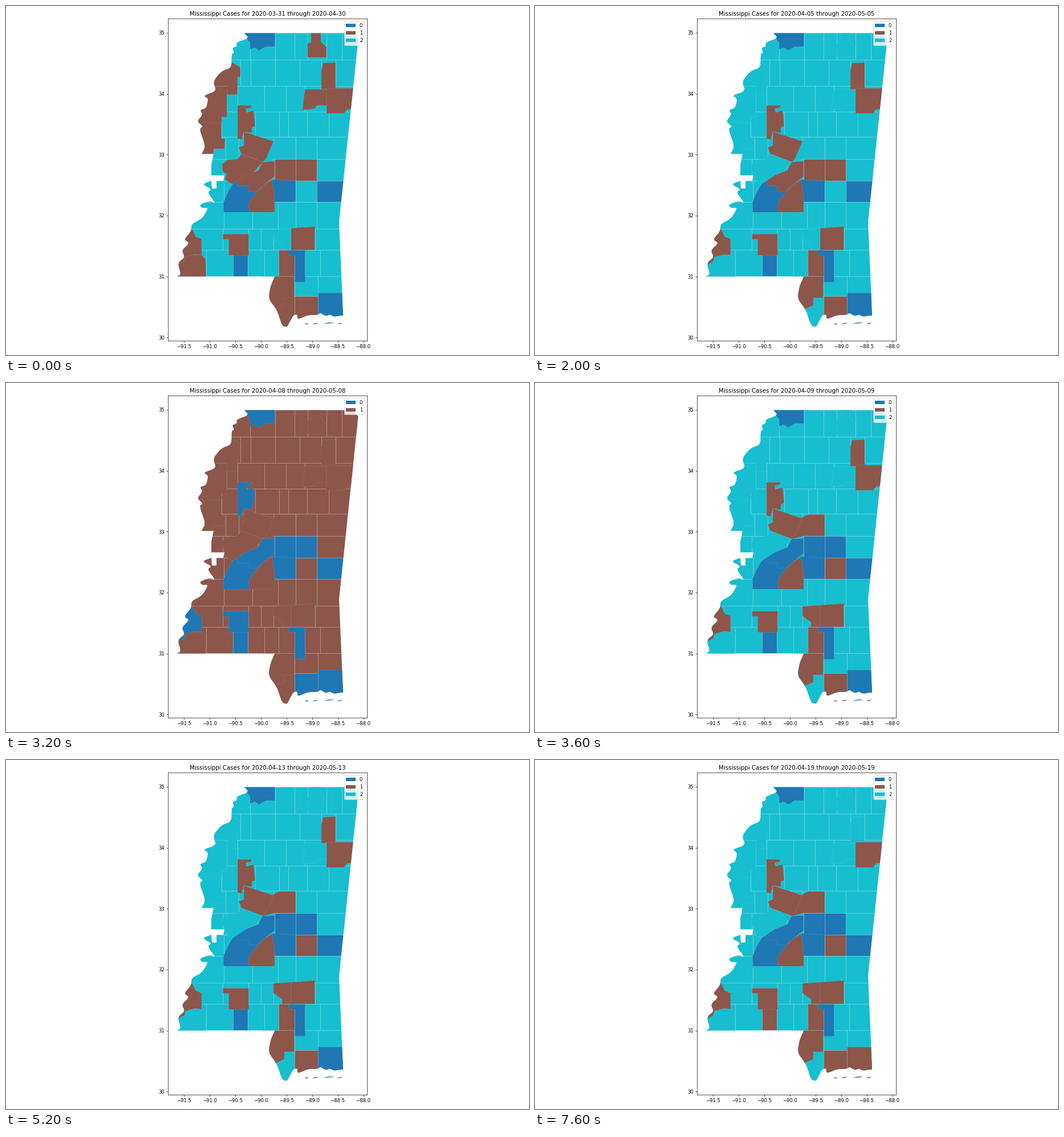
Recreate the animation shown at these times as a matplotlib script. Size 917 px wide and 611 px high, loop 8000 ms.

```python
from collections import defaultdict

import numpy as np
import matplotlib.pyplot as plt
from matplotlib.animation import FuncAnimation
from matplotlib.patches import Patch, Polygon

W, H, DPI = 917, 611, 61.13
LEFT, RIGHT, TOP, BOTTOM = 284, 633, 22, 586.4
COLORS = ["#1f77b4", "#8c564b", "#17becf"]
SEAM = (1, 1, 1, 0.11)
FRAMES, INTERVAL = 20, 400
TWO_CLASS_DAY = 8

plt.rcParams["font.family"] = "DejaVu Sans"
fig = plt.figure(figsize=(W / DPI, H / DPI), dpi=DPI, facecolor="white")
ax = fig.add_axes([LEFT / W, 1 - BOTTOM / H, (RIGHT - LEFT) / W, (BOTTOM - TOP) / H])
# The map is laid out in stage pixels; ticks carry the degrees.
ax.set(xlim=(LEFT, RIGHT), ylim=(BOTTOM, TOP))
lon, lat = np.arange(-91.5, -87.9, 0.5), np.arange(30, 36)
ax.set_xticks(312 + (lon + 91.5) * 89.86, [f"{v:.1f}".replace("-", "\u2212") for v in lon])
ax.set_yticks(47 + (35 - lat) * 106.65, [str(v) for v in lat])


def pts(*xy):
    return np.reshape(xy, (-1, 2))


def winding(*xy):
    """Round the corners of a rough shoreline by cutting them twice."""
    line = pts(*xy)
    for _ in range(2):
        a, b = line[:-1], line[1:]
        cut = np.stack([0.8 * a + 0.2 * b, 0.2 * a + 0.8 * b], axis=1).reshape(-1, 2)
        line = np.vstack([line[:1], cut, line[-1:]])
    return line


east = pts(418, 47.5, 608.5, 47.5, 617.6, 58.5, 584, 378, 591, 542)
gulf = winding(591, 542, 586, 542, 575, 544, 568, 540, 561, 543, 551, 537, 547, 541, 530, 541,
               511, 549, 511, 540, 504, 541, 496, 556, 493, 562, 484, 560, 475, 532, 460, 512,
               464, 490, 471.5, 473.5)
river = np.vstack([
    winding(418, 47.5, 426, 56, 404, 64, 405, 71, 397, 73, 400, 82, 395.5, 84, 395.5, 108,
            378, 114, 363, 132, 369, 149, 346, 157, 355, 162, 351, 179, 340, 182, 345, 190,
            335, 202, 346, 211, 339, 215, 350, 246, 343, 259),
    pts(364, 259, 360, 278, 360, 296.5, 383, 296.5, 381, 306, 369, 306, 369, 319.5, 361, 319.5),
    winding(360, 306, 344, 312, 361, 321, 353, 326, 368, 346, 357, 341, 339, 348, 344, 354,
            355, 353, 344, 372, 325, 382, 325, 394, 312, 409, 322, 415, 308, 428, 314, 440,
            301, 450, 307, 470, 300, 473.5),
])
land = ax.add_patch(Polygon(np.vstack([east, gulf, river[::-1]]), fc="none", lw=0))

regions = defaultdict(list)


def paint(name, outline):
    patch = ax.add_patch(Polygon(outline, ec=SEAM, lw=0.85, zorder=2))
    patch.set_clip_path(land)
    regions[name].append(patch)


def county(name, *xy):
    """Redraw a county over its rectangular cell, which falls to the neighbours."""
    regions["rest"] += regions.pop(name, [])
    paint(name, pts(*xy))


def band(top, bottom, names, *splits):
    edges = (270, *splits, 640)
    for name, x0, x1 in zip(names.split(), edges, edges[1:]):
        paint(name, pts(x0, top, x1, top, x1, bottom, x0, bottom))


# Counties lie in west-to-east bands; later shapes cover earlier ones.
band(40, 94.5, "Tunica DeSoto Marshall Benton Tippah Alcorn Tishomingo",
     428, 471.5, 505.5, 529, 562, 589)
band(94.5, 140.5, "Coahoma Quitman Panola Lafayette Pontotoc Lee Itawamba",
     411, 428.5, 471.5, 514.5, 553, 578)
band(140.5, 185, "Bolivar Sunflower Tallahatchie Yalobusha Calhoun Chickasaw Monroe",
     387, 406, 453, 491, 524, 562)
band(185, 229.5, "Washington Sunflower Leflore Carroll Montgomery Webster Oktibbeha Lowndes",
     378, 406, 437, 479, 495, 528, 566)
band(229.5, 268, "Washington Humphreys Holmes Attala Winston Noxubee", 385, 408, 469, 508, 544.5)
band(268, 306, "Issaquena Yazoo Madison Leake Neshoba Kemper", 380, 442, 471, 508, 544.5)
band(306, 343, "Warren Hinds Rankin Scott Newton Lauderdale", 381.5, 427, 471, 508, 544.5)
band(343, 390, "Claiborne Copiah Simpson Smith Jasper Clarke", 381.5, 432, 477, 508, 544.5)
band(390, 427, "Jefferson Lincoln Lawrence Jefferson-Davis Covington Jones Wayne",
     380, 424.5, 447, 469, 500, 541.5)
band(427, 473.5, "Wilkinson Amite Pike Walthall Marion Lamar Forrest Perry Greene",
     351, 397.5, 423.5, 453, 478, 505.5, 523.5, 551)
band(473.5, 508, "Pearl-River Stone George", 505.5, 547)
band(508, 570, "Hancock Harrison Jackson", 505.5, 547)

county("DeSoto", 410, 40, 471.5, 40, 471.5, 71, 455, 71, 444, 78, 436, 73, 428, 76, 428, 64)
county("Tippah", 535, 40, 552, 40, 552, 62, 562, 72, 562, 90, 529, 90, 529, 65, 535, 64)
county("Coahoma", 350, 97, 393, 97, 411, 107, 411, 124, 406, 125, 406, 155, 387, 155,
       387, 140.5, 350, 140.5)
county("Bolivar", 320, 140.5, 387, 140.5, 387, 194, 378, 194, 378, 204, 320, 204)
county("Washington", 320, 204, 378, 204, 378, 232, 384, 233, 383, 250, 364, 250, 364, 262,
       320, 262)
county("Leflore", 406, 174, 430, 174, 430, 178, 420, 180, 422, 186, 434, 183, 437, 210,
       431, 213, 431, 222, 417, 220, 413, 234, 406, 232)
county("Lee", 553, 112, 556, 100, 578, 99, 578, 144, 553, 146)
county("Chickasaw", 524, 146, 562, 146, 562, 174, 545, 174, 541, 180, 520, 182)
county("Monroe", 562, 144, 640, 144, 640, 180, 598, 181, 593, 188, 562, 188)
county("Attala", 450, 273, 465, 237, 479, 230, 508, 230, 508, 268, 471, 268)
county("Holmes", 417, 220, 469, 237, 456, 267, 450, 273, 413, 259, 408, 248, 417, 244)
county("Yazoo", 389, 269, 406, 268, 413, 259, 450, 273, 421, 306, 397, 312, 384, 304,
       387, 294, 380, 290, 379, 277)
county("Hinds", 397, 312, 406, 306, 445, 306, 445, 361, 381.5, 361, 381.5, 343, 389, 326)
county("Scott", 466, 304, 508, 306, 508, 343, 471, 343)
county("Madison", 450, 273, 471, 272, 471, 298, 440, 324, 425, 324, 425, 315, 406, 315,
       406, 306, 421, 296, 442, 288)
county("Rankin", 466, 304, 471, 330, 471, 361, 427, 361, 425, 348, 432, 335, 450, 315)
county("Wilkinson", 290, 435, 343, 436, 350, 443, 351, 480, 290, 480)
county("Adams", 295, 390, 326, 390, 333, 404, 343, 408, 343, 436, 330, 435, 314, 440,
       313, 447, 300, 454)
county("Lincoln", 380, 399, 424.5, 399, 424.5, 436, 390, 436, 390, 408, 380, 408)
county("Covington", 469, 391, 500, 389, 500, 427, 484, 427, 484, 419, 469, 408)
county("Jones", 500, 389, 541.5, 386, 541.5, 427, 500, 427)
county("Forrest", 496, 427, 523.5, 427, 523.5, 483, 505.5, 483, 505.5, 436, 496, 436)
county("Pearl-River", 450, 473.5, 505.5, 473.5, 505.5, 511, 488, 511, 488, 524, 450, 540)
county("Jackson", 547, 502, 640, 502, 640, 570, 547, 570)


def island(name, x0, x1):
    """A thin, tapering barrier island."""
    t = np.linspace(0, 1, 12)
    x, mid, half = x0 + (x1 - x0) * t, 555.7 - np.cos(x0 + 3 * t), 0.8 * np.sin(np.pi * t)
    outline = np.vstack([np.c_[x, mid - half], np.c_[x, mid + half][::-1]])
    regions[name].append(ax.add_patch(Polygon(outline, lw=0, zorder=2)))


for name, x0, x1 in [("Harrison", 523, 531), ("Harrison", 537, 548),
                     ("Jackson", 557, 576), ("Jackson", 581, 590)]:
    island(name, x0, x1)

ALWAYS_0 = ["DeSoto", "Hinds", "Scott", "Lauderdale", "Forrest"]
ALWAYS_1 = ["Leflore", "Holmes", "Rankin", "Adams", "Lincoln", "Jones", "Lamar", "Pearl-River",
            "Harrison", "Monroe"]
JOIN_0 = ["Madison", "Leake", "Neshoba"]
JOIN_1 = ["Attala", "Newton", "Covington"]
LEAVE_1 = ["Tippah", "Coahoma", "Bolivar", "Washington", "Yazoo", "Chickasaw", "Wilkinson",
           "Hancock"]
MERGED_0 = ALWAYS_0 + JOIN_0 + ["Leflore", "Adams", "Lincoln", "Pike", "Harrison", "Jackson"]


def classes(day):
    if day == TWO_CLASS_DAY:
        return dict.fromkeys(regions, 1) | dict.fromkeys(MERGED_0, 0)
    late = day > TWO_CLASS_DAY
    groups = dict.fromkeys(regions, 2)
    groups |= dict.fromkeys(ALWAYS_0, 0) | dict.fromkeys(ALWAYS_1, 1)
    groups |= dict.fromkeys(JOIN_0, 0 if late else 1)
    groups |= dict.fromkeys(JOIN_1, 1 if late else 2)
    groups |= dict.fromkeys(LEAVE_1, 1 if day < 2 else 2)
    groups["Lee"] = 1 if day < 6 or 9 <= day < 15 else 2
    groups["Jackson"] = 0 if day < 15 else 1
    groups["Pike"] = 0 if day < 16 else 1
    return groups


def month_day(day, month, last):
    return f"2020-{month + 1:02d}-{day:02d}" if day else f"2020-{month:02d}-{last}"


def update(day):
    for name, group in classes(day).items():
        for patch in regions[name]:
            patch.set_facecolor(COLORS[group])
    count = 2 if day == TWO_CLASS_DAY else 3
    ax.legend(handles=[Patch(fc=COLORS[k], lw=0, label=str(k)) for k in range(count)],
              loc="upper right")
    ax.set_title(f"Mississippi Cases for {month_day(day, 3, 31)} through {month_day(day, 4, 30)}")
    return []


anim = FuncAnimation(fig, update, frames=FRAMES, interval=INTERVAL, repeat=True, repeat_delay=0)
plt.show()
```
